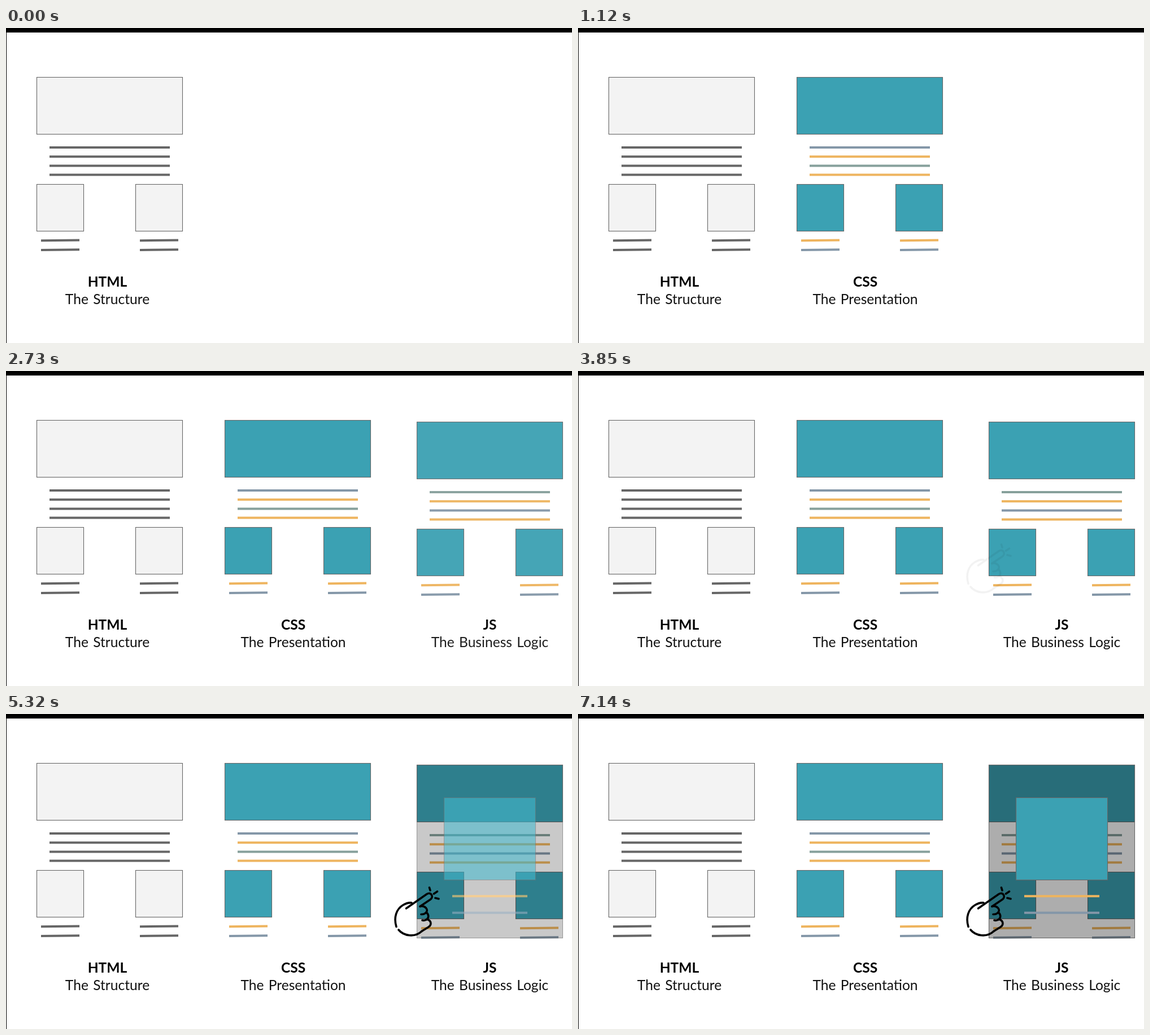
Recreate the animation shown at these times as an HTML page. Size 1002 px wide and 559 px high, loop 7210 ms.

```html
<!DOCTYPE html>
<html lang="en">
<head>
<meta charset="utf-8">
<title>HTML, CSS, JS</title>
<style>
  html, body { margin: 0; width: 100%; height: 100%; overflow: hidden; background: #fff; }
  svg { display: block; }
  text { font: 24.6px Lato, "Open Sans", sans-serif; text-anchor: middle; word-spacing: 2px; fill: #111; }
  .title { font-weight: 700; fill: #000; }
  .box { stroke: #666; stroke-width: 1.1; }
  .bar { stroke-width: 4; }
  #hand { fill: none; stroke: #000; stroke-width: 3.6; stroke-linecap: round; stroke-linejoin: round; }
</style>
</head>
<body>
<svg width="1002" height="559" viewBox="0 0 1002 559">
  <rect width="1002" height="559" fill="#fff"/>
  <path d="M0 0H1002V8H1V559H0Z"/>
  <g id="html"></g>
  <g id="css"></g>
  <g id="js"></g>
  <g id="modal"></g>
  <g id="hand">
    <path d="M691 377.500C686 361 691 346 703 339C708 336 713 334.500 718 335"/>
    <path d="M695 383C704 394 724 397 736 385.500"/>
    <path d="M708.500 345L745 319.500C752 315 758 324 751.500 329L733 341.500"/>
    <path d="M733 341.500C741 339 749 347 743.500 352.500Q740 356 735 355.500"/>
    <path d="M744 352C750 357 748 364 743 365.500Q740 367 737 366"/>
    <path d="M746 364.500C753 367 754 374 748 378L736 385.500"/>
    <path d="M749.500 308L751 313M757.500 319L763.500 315M760 326.500L766 328"/>
  </g>
</svg>
<script>
const LOOP = 7210, STEP = 70;
const GREY = '#666', TEAL = '#3ba1b3', BLUE = '#8497a8', GOLD = '#eeb45e', SAGE = '#86a09b';
const $ = id => document.getElementById(id);

const box = (x, y, w, h, fill) =>
  `<rect class="box" x="${x}" y="${y}" width="${w}" height="${h}" fill="${fill}"/>`;
const bar = (x, y, w, color, tilt = 0) =>
  `<path class="bar" stroke="${color}" d="M${x} ${y + tilt}L${x + w} ${y - tilt}"/>`;

function panel(id, dx, dy, fill, lines, pair, center, title, subtitle) {
  let shapes = box(54.5, 87.5, 258, 101, fill);
  lines.forEach((color, i) => shapes += bar(77, 212 + i * 16.2, 213, color));
  for (const x of [54.5, 229.5]) {
    shapes += box(x, 277.5, 83, 83, fill);
    pair.forEach((color, i) => shapes += bar(x + 7.5, 376.8 + i * 16.8, 68, color, 0.4));
  }
  $(id).innerHTML = `<g transform="translate(${dx} ${dy})">${shapes}</g>
    <text class="title" x="${center}" y="459">${title}</text>
    <text x="${center}" y="490">${subtitle}</text>`;
}

panel('html', 0, 0, '#f3f3f3', [GREY, GREY, GREY, GREY], [GREY, GREY], 179.5, 'HTML', 'The Structure');
panel('css', 333, 0, TEAL, [BLUE, GOLD, SAGE, GOLD], [GOLD, BLUE], 508.5, 'CSS', 'The Presentation');
panel('js', 673, 3, TEAL, [SAGE, GOLD, BLUE, GOLD], [GOLD, BLUE], 856.5, 'JS', 'The Business Logic');

$('modal').innerHTML = box(727.5, 90.5, 258, 307, 'rgba(0,0,0,.32)')
  + box(775.5, 148.5, 162, 146, TEAL)
  + bar(790, 323.3, 133, GOLD) + bar(790, 352.8, 133, BLUE);

// Opacity levels, one per step, held until the next.
const FADE = [0.2, 0.43, 0.66, 0.84, 0.95, 1];

function fadeIn(id, start, levels) {
  const frames = [{ opacity: 0, offset: 0, easing: 'step-end' }];
  levels.forEach((opacity, i) =>
    frames.push({ opacity, offset: (start + i * STEP) / LOOP, easing: 'step-end' }));
  frames.push({ opacity: 1, offset: 1 });
  $(id).animate(frames, { duration: LOOP, iterations: Infinity });
}

fadeIn('css', 840, [0.3, 0.57, 0.81, 0.94, 1]);
fadeIn('js', 2450, FADE);
fadeIn('hand', 3850, [0.05, 0.22, 0.45, 0.68, 0.86, 0.96, 1]);
fadeIn('modal', 5180, FADE);
</script>
</body>
</html>
```
